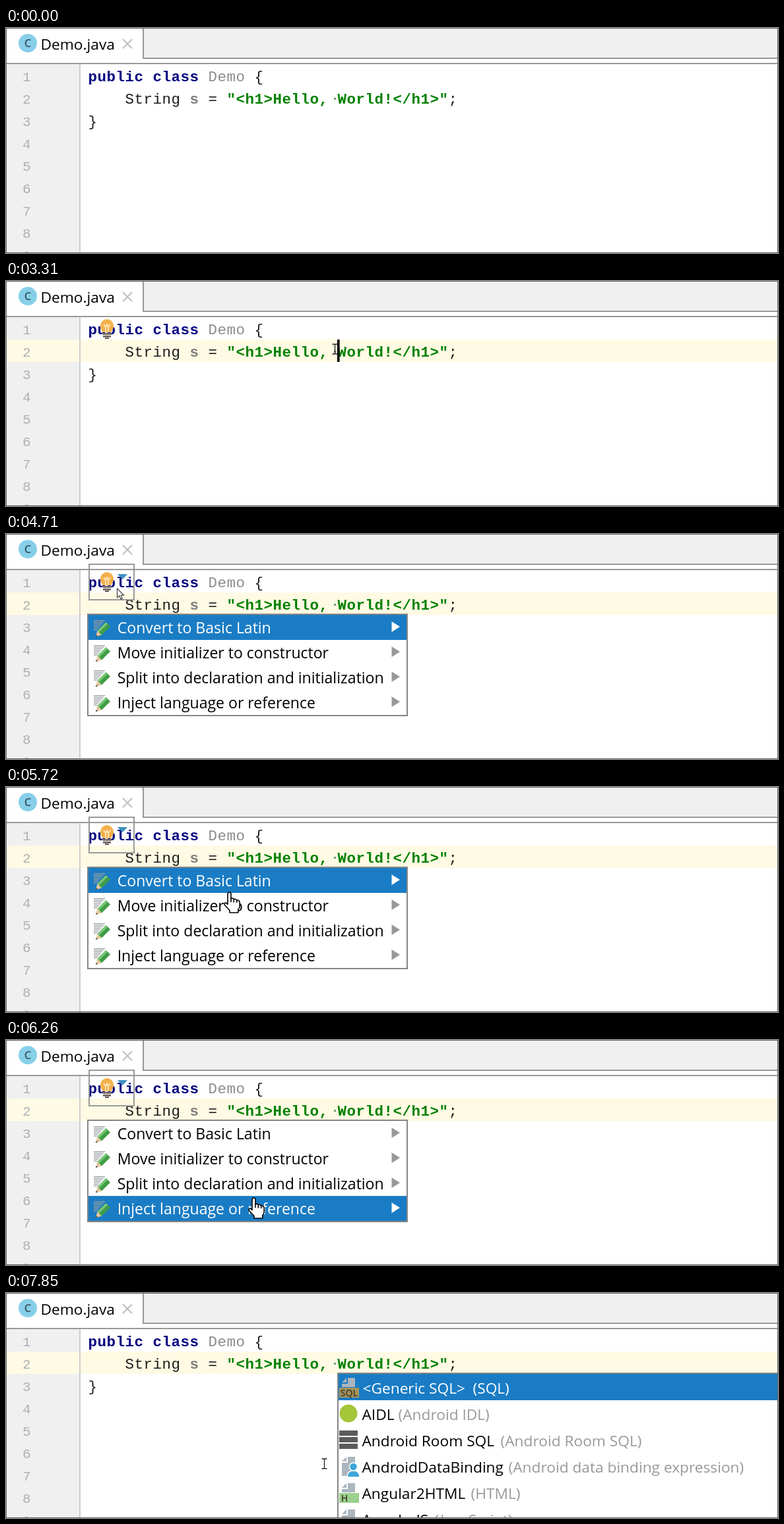
Animation of 1170x342 px, one loop 8 s. Source, as an HTML page:

```html
<!DOCTYPE html>
<html lang="en">
<head>
<meta charset="utf-8">
<title>Demo.java</title>
<style>
html, body { margin: 0; width: 100%; height: 100%; overflow: hidden; background: #fff; }
svg { display: block; width: 1170px; height: 342px; }
text { white-space: pre; }
.code { font: 22.5px "Liberation Mono", "Courier New", monospace; letter-spacing: 0.5px; }
.bold { font-weight: bold; }
.num { font-size: 21px; }
.ui { font: 22.7px "Open Sans", "Noto Sans", sans-serif; }
.action { font-size: 23.05px; }
</style>
</head>
<body>
<svg id="stage" viewBox="0 0 1170 342" xmlns="http://www.w3.org/2000/svg"></svg>
<script>
const LOOP = 8000, BLUE = '#1a7cc4', EDGE = '#868686';
const stage = document.getElementById('stage');

const rect = (x, y, w, h, fill, more = '') =>
  `<rect x="${x}" y="${y}" width="${w}" height="${h}" fill="${fill}" ${more}/>`;
const path = (d, fill, more = '') => `<path d="${d}" fill="${fill}" ${more}/>`;
const text = (x, y, s, fill, cls) =>
  `<text x="${x}" y="${y}" fill="${fill}" class="${cls}">${s.replace(/</g, '&lt;')}</text>`;
const group = (id, body, more = '') => `<g id="${id}" ${more}>${body}</g>`;

const baseline = row => 81 + 34 * row;
const code = (row, col, s, fill = '#1c1c1c', bold = false) =>
  text(124.6 + 14 * col, baseline(row), s, fill, bold ? 'code bold' : 'code');

function tabs() {
  return rect(208, 0, 962, 46, '#f0f0f0') +
    path('M208 0V46H1170', 'none', 'stroke="#999" stroke-width="2"') +
    rect(0, 53, 1170, 2, '#999') +
    '<circle cx="33" cy="23" r="14" fill="#87cfe9"/>' +
    '<text x="33" y="29" text-anchor="middle" fill="#3b5360" style="font:600 16.5px Open Sans, sans-serif">C</text>' +
    text(52.5, 33, 'Demo.java', '#000', 'ui') +
    path('M177 17L191 31M191 17L177 31', 'none', 'stroke="#bcc2c6" stroke-width="2.2"');
}

function editor() {
  let out = rect(0, 55, 112, 287, '#f0f0f0') +
    group('line', rect(0, 89, 1170, 34, '#fffae3')) +
    rect(111, 55, 2, 287, '#cecece');
  for (let i = 0; i < 9; i++) out += text(25, baseline(i), String(i + 1), '#adb1b4', 'code num');
  return out +
    code(0, 0, 'public class', '#000080', true) + code(0, 13, 'Demo', '#8c8c8c') + code(0, 18, '{') +
    code(1, 4, 'String') + code(1, 11, 's', '#808080', true) + code(1, 13, '=') +
    code(1, 15, '"<h1>Hello,', '#008000', true) + code(1, 27, 'World!</h1>"', '#008000', true) +
    code(1, 39, ';') + code(2, 0, '}') +
    rect(497, 106, 3, 3, '#6f9a6f') +
    group('caret', rect(502, 89, 3.6, 34, '#000'));
}

function bulb() {
  return group('bulb',
    path('M147 78C144 74 143 72 143 68A10 10 0 0 1 163 68C163 72 162 74 159 78Z', '#f3b04b') +
    path('M148 66L151 70L153 66L155 70L158 66M151 70V78M155 70V78', 'none', 'stroke="#fff0cf" stroke-width="1.5"') +
    rect(146.5, 79, 13, 3, '#7d7068') + rect(147, 83, 12, 2.5, '#655b56') + rect(150, 86, 6, 2, '#655b56')) +
    group('frame',
      rect(126, 46, 68, 54, 'none', 'stroke="#999" stroke-width="2"') +
      path('M169 61H184L176.5 69Z', '#3e8fbf'));
}

function pencil(y) {
  let out = '';
  for (let i = 0; i < 7; i++) out += rect(133, y + 8 + i * 2.4, 17 - i * 2, 1.2, '#979da2');
  return out +
    path(`M151.5 ${y + 11}L158 ${y + 17.5}L145 ${y + 30.5}L138.5 ${y + 24}Z`, '#3f9d45') +
    path(`M151.5 ${y + 11}L154 ${y + 13.5}L141 ${y + 26.5}L138.5 ${y + 24}Z`, '#79c877') +
    path(`M138.5 ${y + 24}L145 ${y + 30.5}L136 ${y + 33}Z`, '#e3c79a') +
    path(`M136.8 ${y + 30}L139 ${y + 32.2}L136 ${y + 33}Z`, '#444');
}

const actions = ['Convert to Basic Latin', 'Move initializer to constructor',
  'Split into declaration and initialization', 'Inject language or reference'];

function menu() {
  const rows = actions.map((s, i) => {
    const y = 123 + 38 * i;
    return `<g class="item">${rect(125, y, 482, 38, 'none')}${pencil(y)}` +
      text(168.7, y + 28, s, '#000', 'ui action') +
      path(`M584.5 ${y + 10}L597 ${y + 18}L584.5 ${y + 26}Z`, '#999') + '</g>';
  });
  return group('menu',
    rect(124, 122, 484, 154, '#fff', `stroke="${EDGE}" stroke-width="2"`) + rows.join(''));
}

const sheet = (y, h) =>
  path(`M518 ${y}H529V${y + h}H509V${y + 9}H518Z`, '#abb6bf') +
  path(`M516 ${y}V${y + 7}H509Z`, '#abb6bf');
const badge = (y, s, fill, x) => rect(505, y, 30, 15, fill) +
  `<text x="${x}" y="${y + 13}" text-anchor="middle" fill="#3d3a2c" style="font:600 14px Open Sans, sans-serif">${s}</text>`;

function languages() {
  const list = [['<Generic SQL>', 708, '(SQL)'], ['AIDL', 595, '(Android IDL)'],
    ['Android Room SQL', 750, '(Android Room SQL)'],
    ['AndroidDataBinding', 762, '(Android data binding expression)'],
    ['Angular2HTML', 705, '(HTML)'], ['AngularJS', 650, '(JavaScript)']];
  const rows = list.map(([name, x, note], i) =>
    text(i ? 539.5 : 540.5, 153 + 40 * i, name, i ? '#000' : '#fff', 'ui') +
    text(x - 0.5, 153 + 40 * i, note, i ? '#999' : '#fff', 'ui'));
  const bars = [209, 219, 229].map(y => rect(505, y, 28, 8, '#595b5d'));
  return group('langs',
    rect(502, 121, 668, 221, EDGE) + rect(504, 123, 666, 219, '#fff') + rect(504, 123, 666, 40, BLUE) +
    sheet(129, 14) + badge(144, 'SQL', '#a5925c', 520) +
    '<circle cx="519" cy="183" r="13.5" fill="#a4c639"/>' + bars.join('') +
    sheet(249, 29) +
    path('M517 280C517 272 521 270 526.5 270S536 272 536 280Z', '#3fa7d6', 'stroke="#fff" stroke-width="1.5"') +
    '<circle cx="526.5" cy="264" r="6" fill="#3fa7d6" stroke="#fff" stroke-width="1.5"/>' +
    sheet(289, 14) + badge(304, 'H', '#9bd18c', 513) + sheet(329, 14) + rows.join(''));
}

// Pointer shapes are drawn from the top left corner of their box.
function pointers() {
  const ink = 'stroke="#000" stroke-width="1.6" stroke-linejoin="round"';
  return group('beam', path('M0.5 1H3.5L4.5 2L5.5 1H8.5M4.5 2V15M0.5 16H3.5L4.5 15L5.5 16H8.5',
      'none', 'stroke="#222" stroke-width="1.3"')) +
    group('arrow', path('M0.5 0.8V14.8L3.8 11.8L6 17L8.4 16L6.2 11H10.6Z',
      '#fff', 'stroke="#333" stroke-width="1.1"')) +
    group('hand',
      path('M6 4Q6 1 8.5 1T11 4V10.5Q14 9.5 15.3 11.5Q18.5 10.7 19.7 13Q24.2 12.6 24.2 17V22Q24 25 21.8 27.5V32H9V28.5L1.5 20.5Q0.3 16.8 3.4 17L6 19.3Z', '#fff', ink) +
      path('M11 10V16M15.3 11.5V16.5M19.7 13V17', 'none', ink));
}

stage.innerHTML = rect(0, 0, 1170, 342, '#fff') + tabs() + editor() + bulb() + menu() + languages() +
  pointers() + rect(0.5, 0.5, 1169, 341, 'none', 'stroke="#666"');

const el = {};
stage.querySelectorAll('g[id]').forEach(g => el[g.id] = g);
const items = [...stage.querySelectorAll('.item')];

const moves = [
  [1250, 'beam', 906, 330], [1370, 'beam', 764, 191], [1520, 'beam', 634, 139],
  [1670, 'beam', 572, 119], [1820, 'beam', 520, 103], [1940, 'beam', 494, 95],
  [3590, 'beam', 438, 93], [3740, 'beam', 198, 85], [3890, 'beam', 172, 77],
  [4010, 'arrow', 160, 71], [4130, 'arrow', 157, 69], [4560, 'arrow', 168, 82],
  [5300, 'beam', 222, 91], [5450, 'beam', 262, 110], [5570, 'hand', 304, 143],
  [5720, 'hand', 330, 159], [5870, 'hand', 343, 183], [6020, 'hand', 354, 207],
  [6140, 'hand', 361, 223], [6260, 'hand', 367, 239], [6410, 'hand', 393, 251],
  [6530, 'hand', 422, 260], [6650, 'hand', 447, 263], [6800, 'hand', 470, 263],
  [6950, 'hand', 478, 263], [7850, 'beam', 478, 251]
];
const picks = [4710, 5870, 6020, 6260];

const last = (list, test) => list.filter(test).pop();
const show = (id, on) => el[id].setAttribute('display', on ? 'inline' : 'none');

function draw(t) {
  const within = (a, b = LOOP) => t >= a && t < b;
  show('line', within(2340));
  show('caret', within(2340, 3590) || within(4130, 4710));
  show('bulb', within(3310, 7850));
  show('frame', within(4010, 7850));
  show('menu', within(4710, 7850));
  show('langs', within(7850));

  const chosen = picks.filter(p => t >= p).length - 1;
  items.forEach((g, i) => {
    const on = i === chosen;
    g.firstChild.setAttribute('fill', on ? BLUE : 'none');
    g.querySelector('text').setAttribute('fill', on ? '#fff' : '#000');
    g.lastChild.setAttribute('fill', on ? '#fff' : '#999');
  });

  const now = last(moves, m => t >= m[0]);
  for (const id of ['beam', 'arrow', 'hand']) show(id, now && now[1] === id);
  if (now) el[now[1]].setAttribute('transform', `translate(${now[2]} ${now[3]})`);
}

const start = performance.now();
function tick() {
  draw((performance.now() - start) % LOOP);
  requestAnimationFrame(tick);
}
tick();
</script>
</body>
</html>
```
